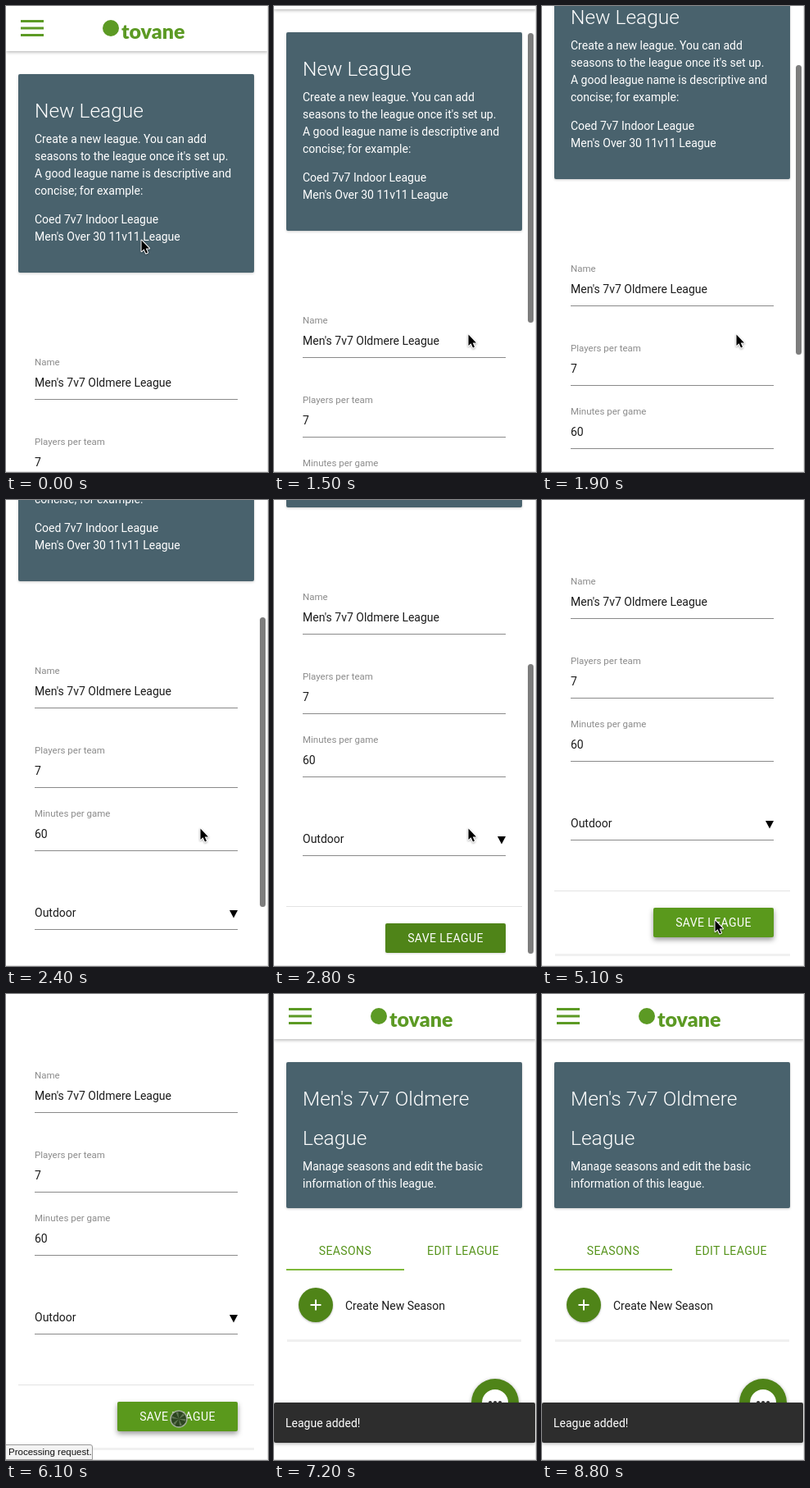
Animation, 320 px wide and 568 px high, one loop 8900 ms. Source, as an HTML page:

```html
<!DOCTYPE html>
<html lang="en">
<head>
<meta charset="utf-8">
<title>New League</title>
<style>
  html, body { margin: 0; width: 100%; height: 100%; overflow: hidden; background: #fff; }
  svg { display: block; width: 100%; height: 100%; }
  text { font: 14px Roboto, sans-serif; fill: #1c1c1c; }
  .card { fill: #49626d; filter: drop-shadow(0 1px 1.5px #0003); }
  .light text { fill: #fff; }
  .light .title { font-size: 24.5px; font-weight: 300; }
  .label { font-size: 11.5px; fill: #8c8c8c; }
  .caps { letter-spacing: .4px; text-anchor: middle; }
  .tab { fill: #56941b; }
  .brand { font: 900 25px Lato, sans-serif; fill: #5c9a24; }
  .status { font: 11.5px "Liberation Sans", sans-serif; fill: #111; }
  .rule { stroke: #8a8a8a; }
  .faint { stroke: #e3e3e3; }
  .edge { stroke: #f0f0f0; stroke-width: 3; }
</style>
</head>
<body>
<svg viewBox="0 0 320 568">
  <defs>
    <g id="header">
      <rect width="320" height="55" fill="#fff" style="filter: drop-shadow(0 1px 2px #0005)"/>
      <path d="M18 18.5H46M18 27H46M18 35.5H46" stroke="#5c9a24" stroke-width="3"/>
      <circle cx="128" cy="27" r="10" fill="#5c9a24"/>
      <text class="brand" x="141" y="40">tovane</text>
    </g>
  </defs>

  <g id="form">
    <use href="#header"/>
    <rect class="card" x="15" y="83" width="288" height="242" rx="2"/>
    <g class="light">
      <text class="title" x="35" y="136">New League</text>
      <text x="35" y="167">Create a new league. You can add</text>
      <text x="35" y="188">seasons to the league once it's set up.</text>
      <text x="35" y="209">A good league name is descriptive and</text>
      <text x="35" y="230">concise; for example:</text>
      <text x="35" y="265">Coed 7v7 Indoor League</text>
      <text x="35" y="286">Men's Over 30 11v11 League</text>
    </g>
    <g id="fields"></g>
    <path d="M273 726H283L278 735.5Z" fill="#000"/>
    <path class="faint" d="M15 811.5H303"/>
    <rect id="save" x="136" y="832" width="147" height="36" rx="2"/>
    <g class="light"><text class="caps" x="209.5" y="855">SAVE LEAGUE</text></g>
    <path class="edge" d="M16 889.5H303"/>
  </g>

  <g id="league">
    <use href="#header"/>
    <rect class="card" x="15" y="83" width="288" height="178" rx="2"/>
    <g class="light">
      <text class="title" x="35" y="136">Men's 7v7 Oldmere</text>
      <text class="title" x="35" y="184">League</text>
      <text x="35" y="215">Manage seasons and edit the basic</text>
      <text x="35" y="236">information of this league.</text>
    </g>
    <text class="caps tab" x="87" y="318">SEASONS</text>
    <text class="caps tab" x="231" y="318">EDIT LEAGUE</text>
    <path d="M15 336H159" stroke="#7fb93a" stroke-width="2"/>
    <circle cx="51" cy="379" r="21" fill="#4f8418" style="filter: drop-shadow(0 1px 1px #0004)"/>
    <path d="M44.5 379H57.5M51 372.5V385.5" stroke="#fff" stroke-width="2"/>
    <text x="87" y="385">Create New Season</text>
    <path class="edge" d="M16 422.5H302"/>
    <circle cx="270" cy="498" r="29" fill="#4f8418" style="filter: drop-shadow(0 1px 2px #0005)"/>
    <circle cx="270" cy="498" r="16" fill="#fff"/>
    <path d="M264 498h.1M270 498h.1M276 498h.1" stroke="#333" stroke-width="4" stroke-linecap="round"/>
    <g id="toast" class="light">
      <rect y="498" width="319" height="49" rx="2" fill="#2d2d2d" style="filter: drop-shadow(0 1px 2px #0005)"/>
      <text x="14" y="528">League added!</text>
    </g>
  </g>

  <path class="faint" d="M319.5 0V568M0 567.5H320"/>
  <rect id="scrollbar" x="310" width="7" height="353" rx="3.5" fill="#7d7d7d"/>
  <g id="status">
    <path d="M-1 549.5H103Q105.5 549.5 105.5 552V567.5H-1Z" fill="#f3f3f3" stroke="#999"/>
    <text class="status" x="3" y="562">Processing request.</text>
  </g>
  <g id="busy" transform="translate(211 518)">
    <circle r="10" fill="#2c4520" stroke="#a3ad9b" stroke-width="1.5"/>
    <circle r="4.5" fill="none" stroke="#5d7450" stroke-width="8" stroke-dasharray="1.5 3.21"/>
  </g>
  <path id="cursor" d="M.5 .5V14L3.6 11.2L6 16.5L8 15.6L5.7 10.4H10Z" stroke="#fff" stroke-width="2"
        stroke-linejoin="round" style="paint-order: stroke; filter: drop-shadow(0 1px 1px #0005)"/>
</svg>
<script>
  const LOOP = 8900, STEP = 100;
  const SCROLL = [[1100, 0], [1500, 51], [1900, 114], [2800, 316], [3200, 335]];
  const CURSOR_X = [[200, 165], [1000, 237], [3500, 237], [3900, 222], [4600, 211]];
  const CURSOR_Y = [[200, 285], [1000, 400], [3500, 400], [3900, 446], [4600, 512]];
  const HOVER = 4600, CLICK = 5500, STATUS = 5700, SAVED = 6800;

  const $ = id => document.getElementById(id);
  const show = (id, visible) => $(id).setAttribute("display", visible ? "inline" : "none");
  const move = (id, x, y) => $(id).setAttribute("transform", `translate(${x} ${y})`);

  // Linear interpolation through [time, value] keys, held at both ends.
  function track(keys, t) {
    const next = keys.findIndex(([time]) => time > t);
    if (next === 0) return keys[0][1];
    if (next < 0) return keys[keys.length - 1][1];
    const [t0, v0] = keys[next - 1], [t1, v1] = keys[next];
    return v0 + (v1 - v0) * (t - t0) / (t1 - t0);
  }

  function field(label, value, y) {
    return `<text class="label" x="35" y="${y - 26}">${label}</text>
      <text x="35" y="${y}">${value}</text>
      <path class="rule" d="M35 ${y + 15.5}H283"/>`;
  }

  $("fields").innerHTML =
    field("Name", "Men's 7v7 Oldmere League", 464) +
    field("Players per team", "7", 561) +
    field("Minutes per game", "60", 638) +
    field("", "Outdoor", 734);

  function draw(t) {
    const scroll = Math.round(track(SCROLL, t));
    const saved = t >= SAVED;
    show("form", !saved);
    show("league", saved);
    move("form", 0, -scroll);

    move("scrollbar", 0, Math.round(0.5 + scroll * 0.63));
    $("scrollbar").setAttribute("opacity", t < 1200 ? 0 : track([[4000, 1], [4300, 0]], t));

    const lift = track([[HOVER - 100, 0], [HOVER + 200, 1]], t);
    $("save").style.fill = lift > 0 ? "#5a991c" : "#4f8418";
    $("save").style.filter = `drop-shadow(0 ${1 + 2 * lift}px ${1 + 2 * lift}px rgba(0,0,0,${0.15 + 0.25 * lift}))`;

    show("cursor", t < CLICK);
    move("cursor", Math.round(track(CURSOR_X, t)), Math.round(track(CURSOR_Y, t)));
    show("busy", t >= CLICK && !saved);
    show("status", t >= STATUS && !saved);

    const rise = track([[SAVED, 0], [SAVED + 300, 1]], t);
    move("toast", 0, 70 * (1 - rise) ** 2);
  }

  function tick() {
    const t = performance.now() % LOOP;
    draw(Math.floor(t / STEP) * STEP);
    requestAnimationFrame(tick);
  }
  tick();
</script>
</body>
</html>
```
